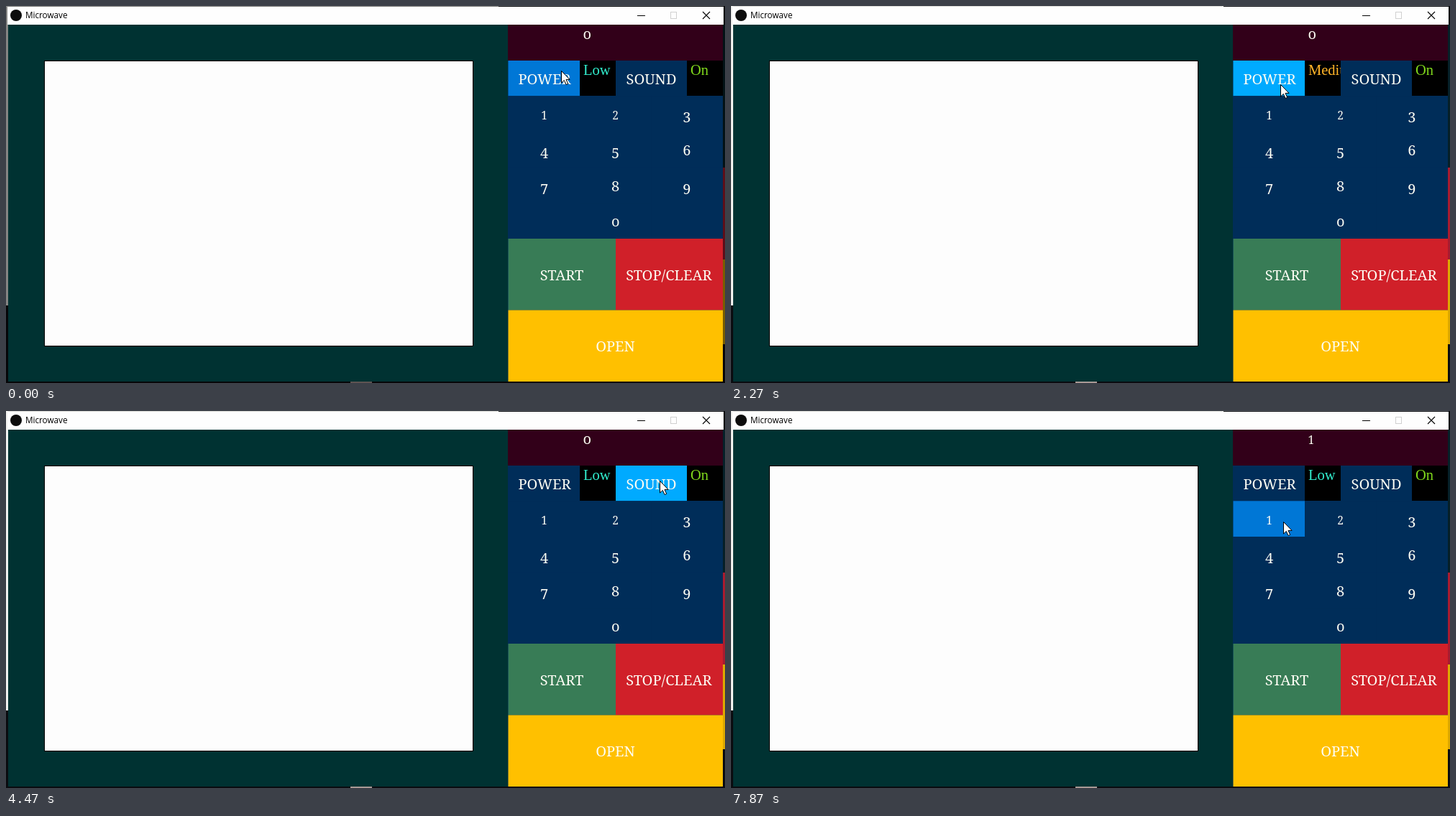
Animation, 1000 px wide and 525 px high, one loop 8000 ms. Source, as an HTML page:

```html
<!DOCTYPE html>
<html lang="en">
<head>
<meta charset="utf-8">
<title>Microwave</title>
<style>
  html, body { margin: 0; width: 100%; height: 100%; overflow: hidden; background: #000; }
  svg { display: block; width: 100vw; height: 100vh; }
  text { font: 20px "Noto Serif", serif; fill: #fdfdf4; }
  text.state { font: 20.5px "Liberation Serif", "Times New Roman", serif; }
  text.title { font: 11.7px "Open Sans", sans-serif; fill: #000; }
</style>
</head>
<body>
<svg id="stage" viewBox="0 0 1000 525" preserveAspectRatio="none"></svg>
<script>
const LOOP = 8000;
const NAVY = '#002d59', HOVER = '#0077d6', PRESSED = '#00aaff';
const stage = document.getElementById('stage');

function add(tag, attrs, content = '') {
  const el = document.createElementNS('http://www.w3.org/2000/svg', tag);
  for (const name in attrs) el.setAttribute(name, attrs[name]);
  el.textContent = content;
  return stage.appendChild(el);
}
const rect = (x, y, width, height, fill, extra = {}) => add('rect', { x, y, width, height, fill, ...extra });
const label = (x, y, content, anchor = 'middle') => add('text', { x, y, 'text-anchor': anchor }, content);
const stateLabel = (x, y) => add('text', { x, y, class: 'state' });

// Old-style figures: 0-2 are x-height, 6 and 8 rise, the others descend.
function setFigure(el, digit, baseline) {
  const small = digit < 3;
  el.textContent = digit === 0 ? 'o' : digit;
  el.style.fontSize = (small && digit > 0 ? 15.5 : 20) + 'px';
  el.setAttribute('y', baseline + (small || digit === 6 || digit === 8 ? 0 : 4));
}

// Desktop showing around the window
rect(0, 0, 1000, 525, '#0a0c10');
rect(0, 0, 685, 1, '#d8d8d4');
rect(0, 0, 3, 417, '#f0f0ee');
rect(997, 26, 3, 199, '#062028');
rect(997, 225, 3, 128, '#a81c30');
rect(997, 353, 3, 118, '#dca800');
rect(479, 523, 30, 2, '#a89894');
const dimmer = rect(0, 0, 1000, 525, '#000');

// Title bar
rect(2, 1, 996, 25, '#fefefe');
add('circle', { cx: 14, cy: 13, r: 8, fill: '#0c0c0c' });
add('text', { class: 'title', x: 27, y: 17 }, 'Microwave');
add('path', { d: 'M878 13.5h11', stroke: '#000' });
rect(924.5, 8.5, 8, 9, 'none', { stroke: '#d0d0d0' });
add('path', { d: 'M969 8l10 10m0-10l-10 10', stroke: '#000', 'stroke-width': 1.1 });

// Oven body, window and panel
rect(3, 26, 695, 497, '#003232');
rect(53.5, 76.5, 596, 397, '#fdfdfd', { stroke: '#000' });
rect(698, 26, 299, 497, NAVY);
rect(698, 26, 299, 50, '#320019');
rect(798, 76, 50, 49, '#000');
rect(947, 76, 50, 49, '#000');
const power = stateLabel(803, 96);
const sound = stateLabel(952, 96);
const display = label(802.5, 46, '', 'start');

const buttons = [];
function button(x, y, w, h, fill = NAVY) {
  buttons.push({ x, y, w, h, fill, el: rect(x, y, w, h, fill) });
}
button(698.5, 76, 99.5, 49.3);
label(749, 108.5, 'POWER');
button(848, 76, 99, 49.3);
label(897.5, 108.5, 'SOUND');
for (let digit = 1; digit <= 10; digit++) {
  const col = digit === 10 ? 1 : (digit - 1) % 3;
  const row = Math.floor((digit - 1) / 3);
  button(698.5 + col * 99.5, 125.3 + row * 49.7, 99.5, 49.7);
  setFigure(label(748.5 + col * 99.2, 0, ''), digit % 10, 158 + row * 49.8);
}
rect(698.5, 324, 149.5, 99.5, '#387c56');
label(773, 382, 'START');
rect(848, 324, 149, 99.5, '#d02029');
label(922, 382, 'STOP/CLEAR');
rect(698.5, 423.5, 298.5, 99.5, '#ffc000');
label(847.5, 481, 'OPEN');

const cursor = add('path', {
  d: 'M0 0V16.5L3.8 12.9L6.6 19L9.2 17.9L6.5 11.9H11.6Z',
  fill: '#fefefe', stroke: '#000', 'stroke-width': 1
});

// Each move: start, end, x, y
const moves = [
  [0, 0, 772, 90],
  [70, 470, 764, 109],
  [3270, 3470, 763, 111],
  [3730, 4270, 909, 97],
  [6730, 7400, 768, 154]
];
const presses = [[600, 730], [2200, 2330], [3200, 3330], [4470, 4600], [5600, 5730], [7600, 7730]];
const powers = [[0, 'Low', '#32f0d0'], [730, 'Medium', '#ffb428'], [2330, 'High', '#e01820'], [3330, 'Low', '#32f0d0']];
const sounds = [[0, 'On', '#80d81c'], [4600, 'Off', '#b40c1c'], [5730, 'On', '#80d81c']];

function cursorAt(t) {
  let [, , x, y] = moves[0];
  for (const [start, end, toX, toY] of moves.slice(1)) {
    const p = Math.min(1, Math.max(0, (t - start) / (end - start)));
    const ease = p * p * (3 - 2 * p);
    x += (toX - x) * ease;
    y += (toY - y) * ease;
  }
  return [x, y];
}

function showState(el, states, t) {
  const [, content, color] = states.filter(s => s[0] <= t).pop();
  el.textContent = content;
  el.style.fill = color;
}

function draw(t) {
  const [x, y] = cursorAt(t);
  const down = presses.some(([from, to]) => t >= from && t < to);
  for (const b of buttons) {
    const over = x >= b.x && x < b.x + b.w && y >= b.y && y < b.y + b.h;
    b.el.setAttribute('fill', over ? (down ? PRESSED : HOVER) : b.fill);
  }
  showState(power, powers, t);
  showState(sound, sounds, t);
  setFigure(display, t < 7730 ? 0 : 1, 46);
  dimmer.setAttribute('opacity', t < 70 ? .45 : 0);
  cursor.setAttribute('transform', `translate(${Math.round(x) + .5} ${Math.round(y) + .5})`);
}

const began = performance.now();
function tick() {
  draw((performance.now() - began) % LOOP);
  requestAnimationFrame(tick);
}
draw(0);
requestAnimationFrame(tick);
</script>
</body>
</html>
```
